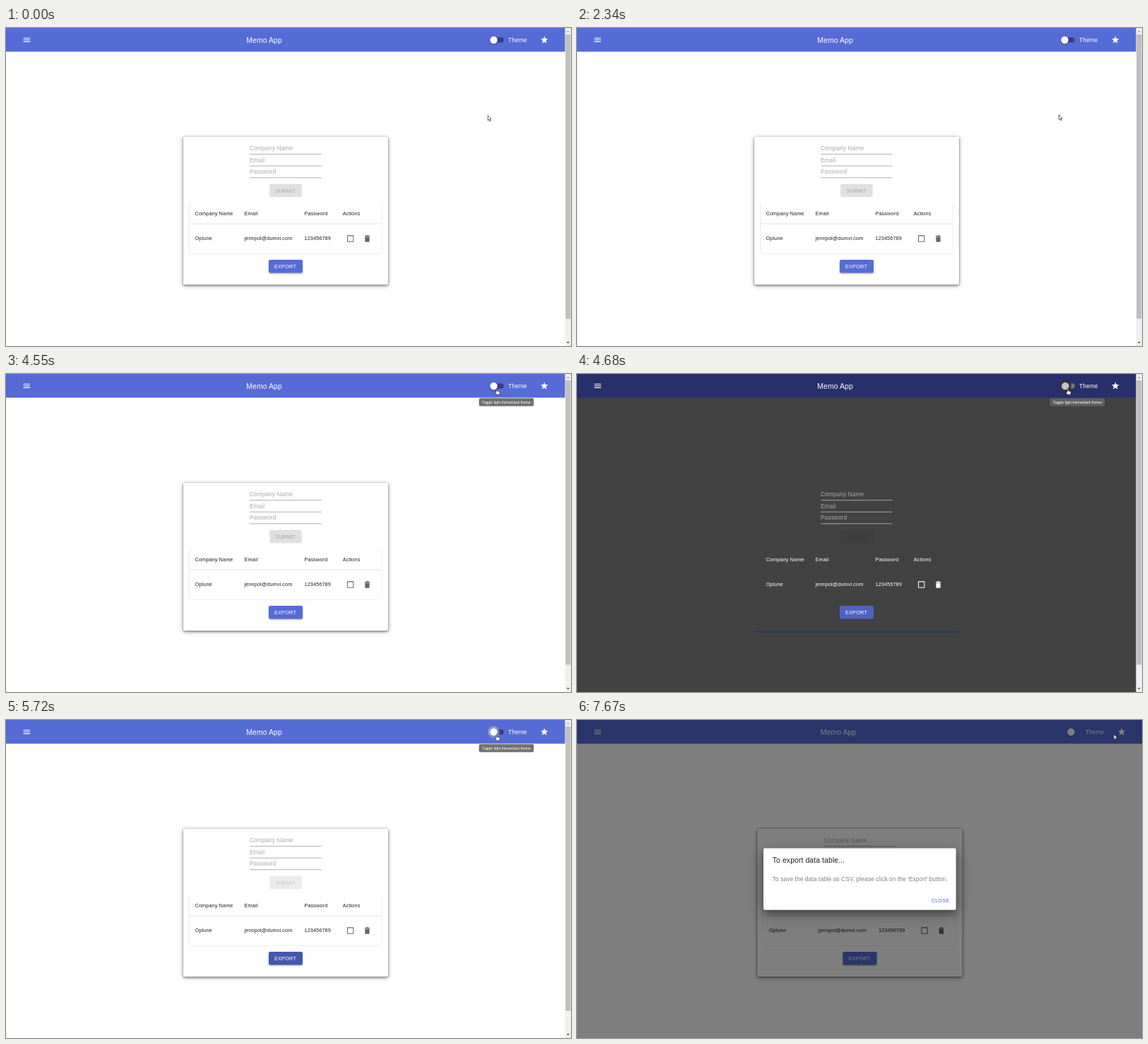
Write an HTML page that moves like this. It is 800x450 px and loops after 8000 ms.

```html
<!DOCTYPE html>
<html lang="en">
<head>
<meta charset="utf-8">
<title>Memo App</title>
<style>
html, body { margin: 0; width: 100%; height: 100%; overflow: hidden; }
svg {
  display: block; width: 100vw; height: 100vh;
  font-family: "Liberation Sans", Arial, sans-serif;
  --page: #fff; --bar: #556cd6; --ink: #222; --hint: #a9a9a9; --line: #a8a8a8;
  --icon: #666; --rule: #e0e0e0; --tip: #707070; --knob: #fff; --track: #343f84; --ripple: #fff;
}
svg.dark {
  --page: #424242; --bar: #27306b; --ink: #fff; --hint: #a8a8a8; --line: #b4b4b4;
  --icon: #fff; --rule: #424242; --tip: #606060; --knob: #c4c4c4; --track: #777; --ripple: #333;
}
.page { fill: var(--page); }
.bar { fill: var(--bar); }
.white { fill: #fff; }
.icon { fill: var(--icon); }
.h6 { font-size: 10.46px; letter-spacing: .0075em; }
.body { font-size: 8.37px; letter-spacing: .00938em; }
.cell { font-size: 7.33px; letter-spacing: .0107em; fill: var(--ink); }
.btn { font-size: 7.33px; letter-spacing: .02857em; }
.tip { font-size: 5.15px; text-anchor: middle; fill: #fff; }
.tipbox { fill: var(--tip); }
.hint { fill: var(--hint); }
.line { stroke: var(--line); }
.card { filter: drop-shadow(0 1px 1.5px rgba(0,0,0,.5)) drop-shadow(0 1px 3px rgba(0,0,0,.3)); }
.paper { filter: drop-shadow(0 .6px .6px rgba(0,0,0,.35)); }
.raised { filter: drop-shadow(0 1px 1px rgba(0,0,0,.35)); }
.dark .card, .dark .paper, .dark .raised { filter: none; }
.glow { display: none; stroke: #29337a; stroke-width: 2; }
.dark .glow { display: inline; }
.dialog { filter: drop-shadow(0 5px 5px rgba(0,0,0,.3)) drop-shadow(0 6px 12px rgba(0,0,0,.25)); }
</style>
</head>
<body>
<svg id="app" viewBox="0 0 800 450" preserveAspectRatio="none">
  <defs>
    <path id="menu" d="M3 18h18v-2H3zM3 13h18v-2H3zM3 6v2h18V6z"/>
    <path id="star" d="M12 17.27L18.18 21l-1.64-7.03L22 9.24l-7.19-.61L12 2 9.19 8.63 2 9.24l5.46 4.73L5.82 21z"/>
    <path id="box" d="M19 5v14H5V5h14m0-2H5c-1.1 0-2 .9-2 2v14c0 1.1.9 2 2 2h14c1.1 0 2-.9 2-2V5c0-1.1-.9-2-2-2z"/>
    <path id="bin" d="M6 19c0 1.1.9 2 2 2h8c1.1 0 2-.9 2-2V7H6zM19 4h-3.5l-1-1h-5l-1 1H5v2h14z"/>
  </defs>

  <rect class="page" width="800" height="450"/>
  <rect class="bar" width="800" height="33.5"/>
  <use class="white" href="#menu" transform="translate(23 10.5) scale(.523)"/>

  <g id="middle">
    <text class="h6 white" x="340.3" y="20.6">Memo App</text>
    <rect class="card page" x="251" y="154" width="290" height="209.3" rx="2"/>
    <path class="glow" d="M253 364.5H540"/>
    <g id="fields"></g>
    <rect id="submit" x="373.2" y="220.7" width="45.5" height="18.6" rx="2"/>
    <text id="submitText" class="btn" x="381.2" y="232.7">SUBMIT</text>
    <rect class="paper page" x="259.5" y="248" width="272.7" height="71.3" rx="2"/>
    <path d="M259.5 277H532.2" stroke="var(--rule)" stroke-width=".9"/>
    <g id="cells"></g>
    <use class="icon" href="#box" transform="translate(481.4 291.8) scale(.523)"/>
    <use class="icon" href="#bin" transform="translate(505.2 291.8) scale(.523)"/>
    <rect id="export" class="raised" x="372" y="328" width="48" height="18.6" rx="2"/>
    <text class="btn white" x="379.9" y="339.8">EXPORT</text>
  </g>

  <g id="right">
    <rect id="track" x="687" y="13.3" width="17.8" height="7.3" rx="3.65" fill="var(--track)"/>
    <circle id="ripple" cy="17" fill="var(--ripple)"/>
    <circle id="knob" cy="17" r="5.2" fill="var(--knob)" class="raised"/>
    <text class="body white" x="711" y="19.8">Theme</text>
    <circle id="starRipple" class="white" cx="760" cy="18"/>
    <use class="white" href="#star" transform="translate(756 10.5) scale(.523)"/>
  </g>

  <g id="scrollbar">
    <rect x="791.5" width="8.5" height="450" fill="#f1f1f1"/>
    <rect x="792.3" y="9" width="7" height="402.5" fill="#bfbfbf"/>
    <path d="M793.8 6l2-2.6 2 2.6z" fill="#a3a3a3"/>
    <path d="M793.8 444l2 2.6 2-2.6z" fill="#505050"/>
  </g>

  <g id="modal">
    <rect width="800" height="450" opacity=".5"/>
    <rect class="dialog white" x="264" y="181.5" width="272.6" height="87.3" rx="2"/>
    <text class="h6" x="276.8" y="202" fill="#222">To export data table...</text>
    <text class="body" x="276.8" y="228" fill="#808080">To save the data table as CSV, please click on the 'Export' button.</text>
    <text class="btn" x="501.8" y="258" fill="#556cd6">CLOSE</text>
  </g>

  <g id="themeTip">
    <rect class="tipbox" x="669.7" y="34.3" width="77.6" height="11.1" rx="2"/>
    <text class="tip" x="708.5" y="41.6">Toggle light theme/dark theme</text>
  </g>
  <g id="starTip">
    <rect class="tipbox" x="742.1" y="34" width="40.4" height="11" rx="2"/>
    <text class="tip" x="762.3" y="41.3">Memo to CSV</text>
  </g>

  <g id="cursor" stroke="#222" stroke-width=".7" stroke-linejoin="round" fill="#fff">
    <path id="arrow" d="M0 0V7L1.6 5.6 2.7 8.1 3.9 7.6 2.8 5.2H4.9Z"/>
    <path id="hand" d="M-.2 .8Q.6-.4 1.2 .8V3.4L4.4 4Q5.2 4.3 5 5.4L4.4 8.7H.4L-1.9 5.6Q-2 4.4-.2 5.3Z"/>
  </g>
</svg>
<script>
const $ = id => document.getElementById(id);
const LOOP = 8000, TO_DARK = 4660, TO_LIGHT = 5620, SHIFT = 7090;

const text = (cls, x, y, s) => `<text class="${cls}" x="${x}" y="${y}">${s}</text>`;

$("fields").innerHTML = ["Company Name", "Email", "Password"].map((s, i) => {
  const y = 173.1 + i * 16.6;
  return text("body hint", 344.9, y, s) + `<path class="line" stroke-width=".9" d="M345.2 ${y + 5.5}h101.5"/>`;
}).join("");

const columns = [267.6, 337.6, 422.5, 476.8];
const rows = [
  ["Company Name", "Email", "Password", "Actions"],
  ["Oplune", "jennpol@dumvi.com", "123456789"]
];
$("cells").innerHTML = rows.map((row, r) =>
  row.map((s, c) => text("cell", columns[c], r ? 300.3 : 264.9, s)).join("")).join("");

const clamp = v => Math.min(1, Math.max(0, v));
const ramp = (t, start, length) => clamp((t - start) / length);
const easeOut = p => 1 - (1 - p) ** 2;
const smooth = p => p * p * (3 - 2 * p);
const mix = (a, b, p) => a + (b - a) * p;
const color = (a, b, p) => `rgba(${a.map((v, i) => mix(v, b[i], p)).join()})`;
const fade = (id, v) => $(id).setAttribute("opacity", v);
const move = (id, x, y = 0) => $(id).setAttribute("transform", `translate(${x} ${y})`);
const show = (id, on) => $(id).style.display = on ? "" : "none";

function drawTheme(t) {
  const dark = t >= TO_DARK && t < TO_LIGHT;
  $("app").classList.toggle("dark", dark);
  const blend = easeOut(ramp(t, TO_DARK, 250)) - easeOut(ramp(t, TO_LIGHT, 250));
  $("export").style.fill = color([85, 108, 214, 1], [39, 48, 107, 1], blend);
  $("submit").style.fill = color([0, 0, 0, .12], [255, 255, 255, .12], blend);
  $("submitText").style.fill = color([0, 0, 0, .26], [255, 255, 255, .3], blend);

  const slide = smooth(ramp(t, TO_DARK, 130)) - smooth(ramp(t, TO_LIGHT, 90));
  const x = mix(690.6, 701.1, slide);
  $("knob").setAttribute("cx", x);
  $("ripple").setAttribute("cx", x);
  const second = t > 5200;
  const press = second ? 5440 : 4600;
  $("ripple").setAttribute("r", mix(4, dark ? 9.8 : 8.2, easeOut(ramp(t, press, 140))));
  const strength = dark ? .9 : .35;
  fade("ripple", t < press ? 0 : strength * (1 - ramp(t, second ? 5740 : 4740, 300)));
}

function drawCursor(t) {
  const up = smooth(ramp(t, 2620, 930));
  const across = smooth(ramp(t, 6260, 600));
  const x = mix(mix(682.3, 694.3, up), 760, across);
  const y = mix(mix(t < 2200 ? 123.8 : 122.8, 20.5, up), 20.2, across);
  const overSwitch = y < 27 && x < 708;
  const overStar = x > 753 && t < SHIFT;
  move("cursor", x, y);
  show("hand", overSwitch || overStar);
  show("arrow", !(overSwitch || overStar));
}

function draw(t) {
  drawTheme(t);
  drawCursor(t);

  const shifted = t >= SHIFT;
  move("middle", shifted ? 4.4 : 0);
  move("right", shifted ? 8.9 : 0);
  move("starTip", shifted ? 8.9 : 0);
  show("scrollbar", !shifted);

  fade("themeTip", ramp(t, 3620, 200) - ramp(t, 6330, 150));
  fade("starTip", ramp(t, 6820, 200) - ramp(t, 7230, 150));
  $("starRipple").setAttribute("r", mix(3, 9.5, easeOut(ramp(t, 7020, 130))));
  fade("starRipple", t < 7020 ? 0 : .2 * (1 - ramp(t, 7180, 300)));

  const open = smooth(ramp(t, 7170, 225));
  fade("modal", open);
  fade("track", 1 - open);
}

function tick(now) {
  draw(now % LOOP);
  requestAnimationFrame(tick);
}
draw(0);
requestAnimationFrame(tick);
</script>
</body>
</html>
```
